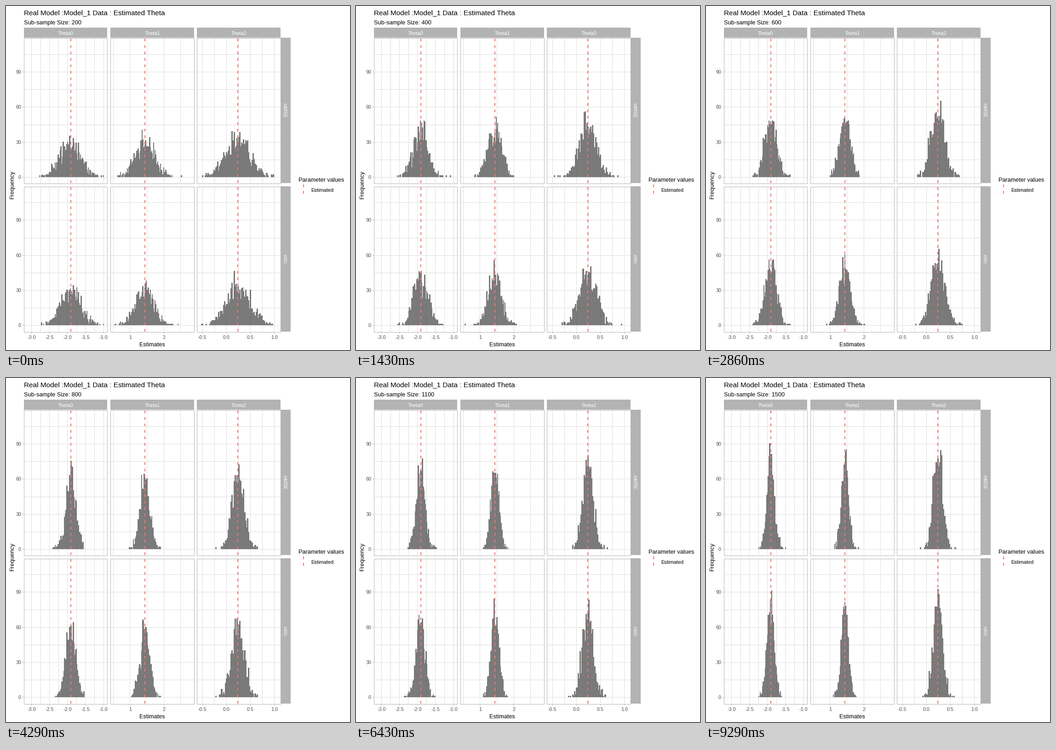
A matplotlib script that plays this animation: 748 px wide and 748 px high, repeating every 10 s.

```python
import math
import numpy as np
import matplotlib
import matplotlib.pyplot as plt
from matplotlib.animation import FuncAnimation
from matplotlib.patches import Rectangle

matplotlib.rcParams["font.family"] = "Liberation Sans"

SIZE, DPI = 748, 64
PT = 72 / DPI  # points per pixel
GREY, GRID, RED, INK = "#B3B3B3", "#DEDEDE", "#F8766D", "#4D4D4D"

LOOP, TICK, STEPS = 10000, 80, 14
TOPS, HEIGHT, WIDTH, PITCH = (69, 392), 316, 181.9, 188.3
ZEROS, PER_COUNT = (371.5, 693.8), 2.543
BIN, DRAWS = 0.02, 1000


class Column:
    def __init__(self, index, origin, scale, estimate, spread, step):
        self.left = 39 + PITCH * index
        self.right = self.left + WIDTH
        self.origin, self.scale = origin, scale
        self.estimate, self.spread, self.step = estimate, spread, step

    def x(self, v):
        return self.origin + v * self.scale

    def value(self, x):
        return (x - self.origin) / self.scale

    def ticks(self):
        """Yield each grid value and whether it carries a label."""
        half = self.step / 2
        first = math.ceil(self.value(self.left) / half)
        last = math.floor(self.value(self.right) / half)
        for k in range(first, last + 1):
            yield k * half, k % 2 == 0

    def edges(self):
        first = math.ceil(self.value(self.left + 8) / BIN)
        last = math.floor(self.value(self.right - 8) / BIN)
        return (np.arange(first, last + 2) - 0.5) * BIN


COLUMNS = (
    Column(0, 290.2, 78.2, -1.91, 0.275, 0.5),
    Column(1, 196.4, 73.4, 1.44, 0.275, 1),
    Column(2, 479.4, 104.3, 0.24, 0.245, 0.5),
)


def outline(size, row, col):
    column = COLUMNS[col]
    sd = column.spread * (200 / size) ** 0.48
    rng = np.random.default_rng(size + 3 * row + col)
    edges = column.edges()
    counts, _ = np.histogram(rng.normal(column.estimate, sd, DRAWS), edges)
    tops = ZEROS[row] - PER_COUNT * counts
    base = [ZEROS[row]]
    y = np.concatenate((base, np.repeat(tops, 2), base))
    return np.column_stack((np.repeat(column.x(edges), 2), y))


fig = plt.figure(figsize=(SIZE / DPI, SIZE / DPI), dpi=DPI, facecolor="white")
ax = fig.add_axes([0, 0, 1, 1])
ax.set_xlim(0, SIZE)
ax.set_ylim(SIZE, 0)
ax.axis("off")


# One-pixel lines snap to half pixels, so they start from whole ones.
def hline(y, x0, x1, color, z):
    y = math.floor(y) + 1
    ax.plot((x0, x1), (y, y), color=color, lw=PT, zorder=z,
            solid_capstyle="butt")


def vline(x, y0, y1, color, z):
    x = math.floor(x)
    ax.plot((x, x), (y0, y1), color=color, lw=PT, zorder=z,
            solid_capstyle="butt")


def dashes(x, bottom, top):
    ax.plot((x, x), (bottom, top), color=RED, lw=2 * PT, zorder=4,
            ls=(0, (3, 4)))


def box(x0, y0, x1, y1, **kw):
    ax.add_patch(Rectangle((x0, y0), x1 - x0, y1 - y0, zorder=5, **kw))


def text(x, y, s, px, color="black", ha="left", va="baseline", rot=0):
    return ax.text(x, y, s, fontsize=px * PT, color=color, ha=ha, va=va,
                   rotation=rot, zorder=6)


bars = {}
for row, top in enumerate(TOPS):
    bottom = top + HEIGHT
    levels = [(c, ZEROS[row] - c * PER_COUNT) for c in range(0, 106, 15)]
    for col, column in enumerate(COLUMNS):
        left, right = math.floor(column.left), math.floor(column.right)
        for _, y in levels:
            hline(y, left, right, GRID, 1)
        for v, _ in column.ticks():
            vline(column.x(v), top, bottom, GRID, 1)
        bars[row, col], = ax.fill([0, 1, 1], [0, 0, 1], color="#595959",
                                  alpha=0.8, lw=0, zorder=3,
                                  antialiased=False, snap=False)
        dashes(column.x(column.estimate), bottom, top)
        box(left, top + 1, right, bottom + 1, fill=False, ec=GREY, lw=PT)
    for c, y in levels[::2][:4]:
        hline(y, 36, 39, GREY, 2)
        text(33, y + 4.3, str(c), 10.8, INK, "right")
    box(597, top, 619, bottom, fc=GREY, lw=0)
    text(605.5, top + HEIGHT / 2, ("mMSE", "mVc")[row], 10.5, "white",
         "center", "center", -90)

for col, column in enumerate(COLUMNS):
    left, right = math.floor(column.left), math.floor(column.right)
    box(left, 47, right, 69, fc=GREY, lw=0)
    text((left + right) / 2, 63, f"Theta{col}", 10.6, "white", "center")
    for v, labelled in column.ticks():
        if labelled:
            vline(column.x(v), 709, 712, GREY, 2)
            label = f"{v:.0f}" if column.step == 1 else f"{v:.1f}"
            text(column.x(v), 724, label, 10.8, INK, "center")

text(39, 19, "Real Model :Model_1 Data : Estimated Theta", 15.4)
subtitle = text(39, 40, "", 12.75)
text(318, 740, "Estimates", 12.6, ha="center")
text(14, 388.5, "Frequency", 13, ha="center", va="center", rot=90)
text(636.5, 382, "Parameter values", 12.6)
text(663, 403.5, "Estimated", 11)
dashes(647, 408, 388)


def draw(i):
    step = (i * TICK + TICK - 1) * STEPS // LOOP
    size = 200 + 100 * min(step, STEPS - 1)
    subtitle.set_text(f"Sub-sample Size: {size}")
    for (row, col), poly in bars.items():
        poly.set_xy(outline(size, row, col))
    return [subtitle, *bars.values()]


anim = FuncAnimation(fig, draw, frames=LOOP // TICK, interval=TICK,
                     repeat=True, repeat_delay=0)
plt.show()
```
